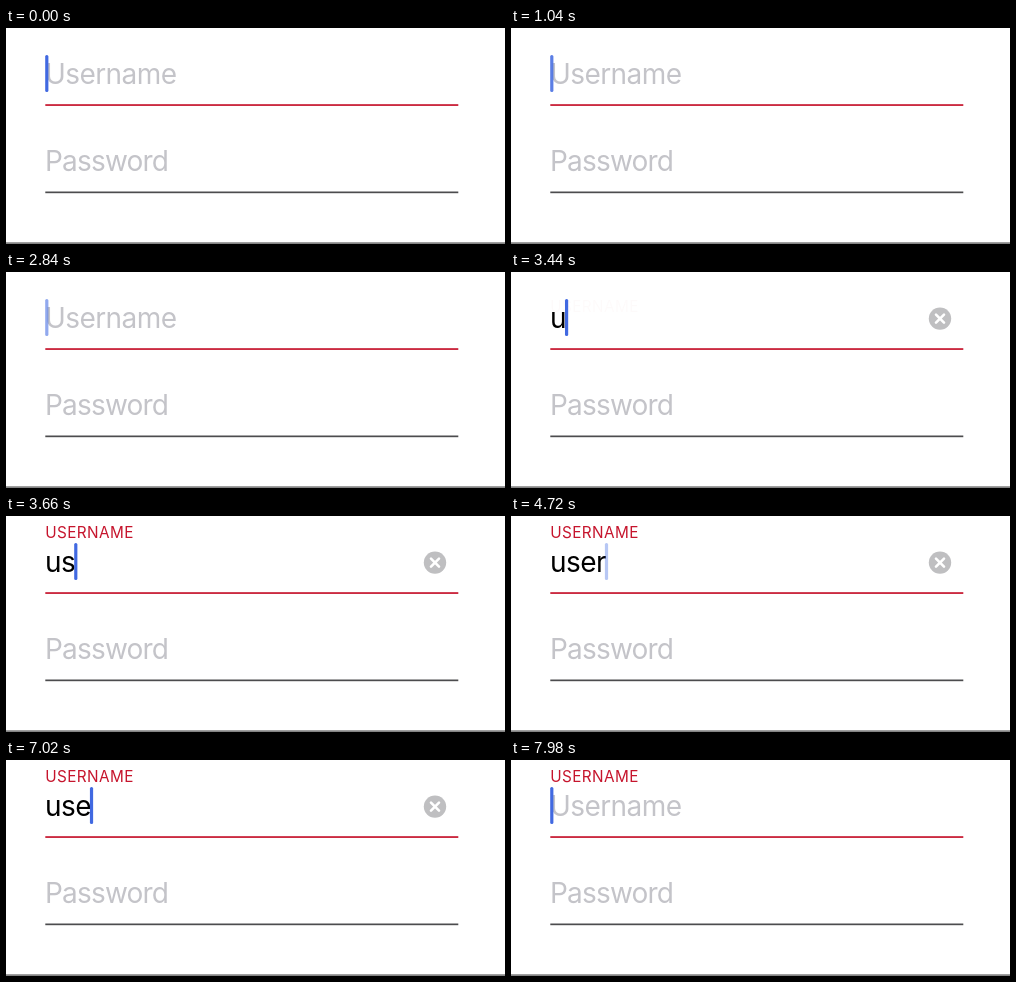
An HTML page that plays this animation: 499x216 px, repeating every 8 s.

```html
<!DOCTYPE html>
<html lang="en">
<head>
<meta charset="utf-8">
<title>Login fields</title>
<style>
  html, body { margin: 0; width: 100%; height: 100%; overflow: hidden; background: #fff; }
  svg { display: block; width: 499px; height: 216px; }
  text { font-family: Inter, "Liberation Sans", sans-serif; }
  .field { font-size: 28px; letter-spacing: -.58px; font-feature-settings: "case"; }
  .hint { fill: #c4c4c9; }
  .tight { letter-spacing: -.8px; }
  .title { font-size: 15.3px; letter-spacing: .42px; }
  .red { fill: #c6152d; }
</style>
</head>
<body>
<svg viewBox="0 0 499 216">
  <text id="title" class="title red" x="39.2" y="21.8">USERNAME</text>
  <text id="hint" class="field hint" x="39" y="56">Username</text>
  <text id="typed" class="field" x="39" y="56"></text>
  <text class="field hint tight" x="39" y="143.2">Password</text>
  <rect class="red" x="39.3" y="76.2" width="413" height="1.7"/>
  <rect x="39.3" y="163.5" width="413" height="1.7" fill="#4c4c4e"/>
  <rect y="214.3" width="499" height="1.6" fill="#777"/>
  <g id="clear">
    <circle cx="429" cy="46.6" r="11.2" fill="#bfbfc1"/>
    <path d="M425 42.6l8 8m0-8l-8 8" stroke="#fff" stroke-width="2.6" stroke-linecap="round"/>
  </g>
  <rect id="caret" y="27" width="3.2" height="37" rx="1.5" fill="#4169e1"/>
</svg>
<script>
  const LOOP = 8000, LEFT = 39;
  const WORD = "user@";
  const presses = [3440, 3620, 3800, 3960, 5020];
  const erases = [6740, 7000, 7300, 7540, 7980];

  // The caret stays solid, fades out, then fades back in.
  const BLINK = 1200, HOLD = 605, FADE_OUT = 250, FADE_IN = 230;
  const FIRST_BLINK = -270;

  const [title, hint, typed, clear, caret] =
    ["title", "hint", "typed", "clear", "caret"].map(id => document.getElementById(id));
  const clamp = v => Math.min(1, Math.max(0, v));
  const easeOut = p => 1 - (1 - p) ** 3;

  function caretAlpha(age) {
    const phase = age % BLINK;
    const fadeOut = 1 - clamp((phase - HOLD) / FADE_OUT);
    const fadeIn = age < BLINK ? 1 : easeOut(clamp(phase / FADE_IN));
    return Math.min(fadeOut, fadeIn);
  }

  function draw(t) {
    const past = times => times.filter(time => time <= t);
    const count = past(presses).length - past(erases).length;
    const lastEdit = Math.max(FIRST_BLINK, ...past(presses), ...past(erases));
    const rise = easeOut(clamp((t - presses[0]) / 200));

    typed.textContent = WORD.slice(0, count);
    hint.style.opacity = count ? 0 : 1;
    clear.style.opacity = count ? 1 : 0;
    title.style.opacity = rise;
    title.setAttribute("y", 21.8 + 18 * (1 - rise));

    const width = count ? typed.getComputedTextLength() : 0;
    caret.setAttribute("x", LEFT + Math.max(0.2, width - 1));
    caret.style.opacity = caretAlpha(t - lastEdit);
  }

  const begin = performance.now();
  function tick() {
    draw((performance.now() - begin) % LOOP);
    requestAnimationFrame(tick);
  }
  draw(0);
  requestAnimationFrame(tick);
</script>
</body>
</html>
```
